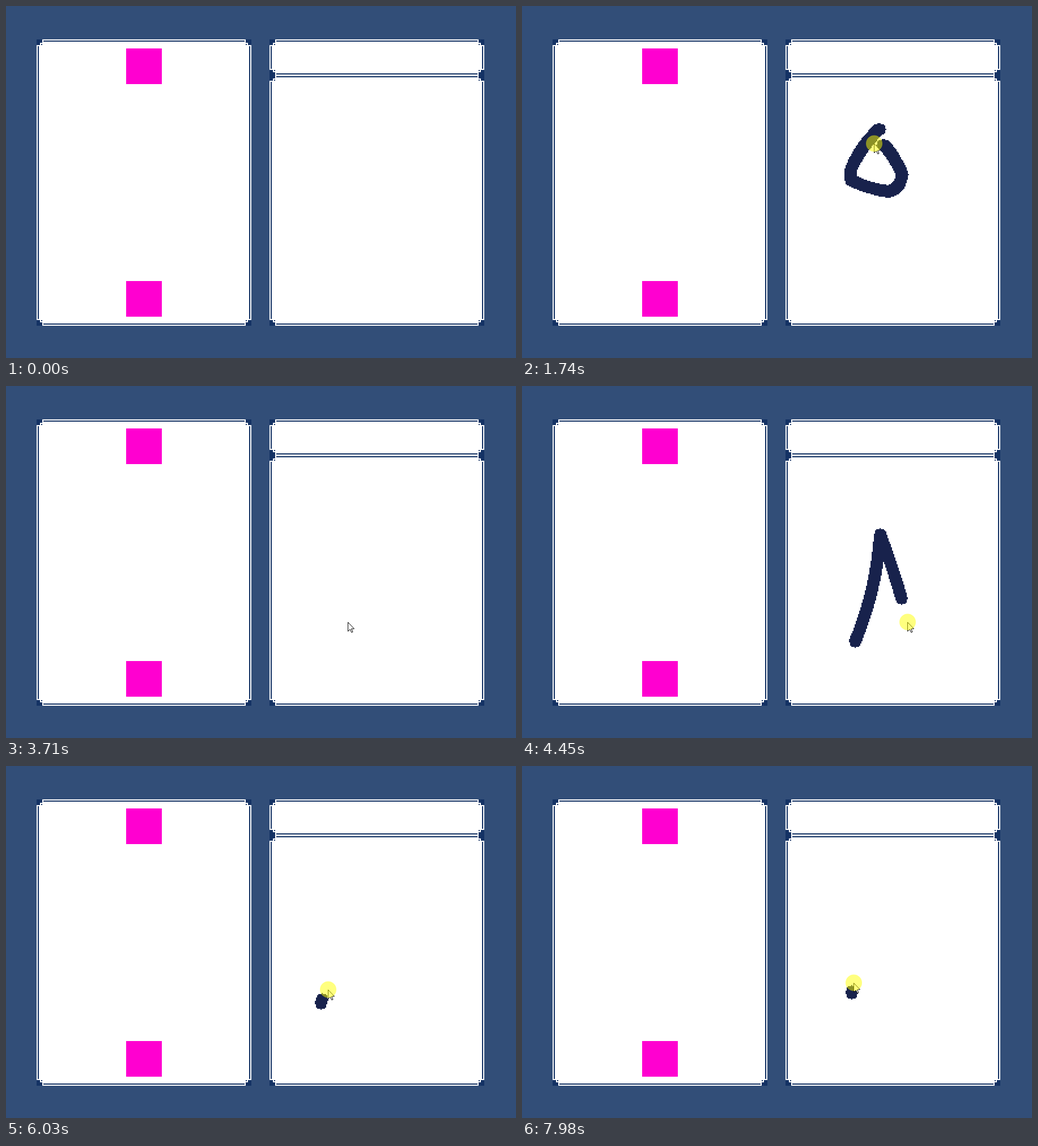
Animation of 900 by 622 pixels, one loop 8 s. Source, as an HTML page with a canvas:

```html
<!DOCTYPE html>
<html lang="en">
<head>
<meta charset="utf-8">
<title>Drawing gestures</title>
<style>
  html, body { margin: 0; width: 100%; height: 100%; overflow: hidden; background: #324e78; }
  canvas { display: block; width: 900px; height: 622px; }
</style>
</head>
<body>
<canvas id="stage" width="900" height="622"></canvas>
<script>
const ctx = document.getElementById('stage').getContext('2d');
const LOOP = 8000, LAG = 60;
const CELL = 2, BRUSH = 5;
const LEFT = 54, RIGHT = 465, TOP = 59, WIDTH = 379, HEIGHT = 506;
const BACK = '#324e78', NAVY = '#143264', INK = '#18224c', PINK = '#ff00d0';

// A stop is the time and place the pointer reaches, and the bow of the way there.
const stop = (t, x, y, bow = 0) => ({ t, x, y, bow });

const gestures = [
  { clear: 1880, stops: [
    stop(950, 631, 217), stop(1180, 579, 292, 5), stop(1240, 579, 307),
    stop(1440, 648, 328, 3), stop(1560, 671, 297, 6), stop(1660, 640, 246, 2),
    stop(1740, 621, 243)
  ] },
  { clear: 5420, stops: [
    stop(3900, 588, 451), stop(4220, 632, 262, 8), stop(4500, 688, 451, -4),
    stop(4780, 569, 346, 4), stop(4990, 825, 273, -7), stop(5050, 811, 282),
    stop(5250, 606, 409)
  ] },
  { clear: 7050, stops: [
    stop(5950, 555, 419), stop(6030, 567, 396), stop(6190, 623, 186, 15),
    stop(6400, 701, 421, 11), stop(6570, 541, 311, -4), stop(6740, 716, 270, 2),
    stop(6840, 622, 371, 1), stop(6900, 593, 384)
  ] },
  { clear: LOOP, stops: [stop(7900, 582, 402), stop(7980, 585, 383)] }
];
const wander = [
  stop(40, 819, 588), stop(830, 661, 226, 10),
  stop(2490, 575, 305, -40), stop(2680, 849, 155), stop(2830, 701, 201),
  stop(3040, 701, 201), stop(3700, 604, 415, 10)
];

// The pointer rests at the end of each gesture until it clears.
const rest = g => ({ ...g.stops[g.stops.length - 1], t: g.clear, bow: 0 });
const route = gestures
  .flatMap(g => [...g.stops, rest(g)])
  .concat(wander)
  .sort((a, b) => a.t - b.t);

function pointerAt(t) {
  const i = Math.max(1, route.findIndex(s => s.t > t));
  const a = route[i - 1], b = route[i];
  const k = (t - a.t) / (b.t - a.t);
  const dx = b.x - a.x, dy = b.y - a.y;
  const side = 4 * k * (1 - k) * b.bow / (Math.hypot(dx, dy) || 1);
  return [a.x + dx * k - dy * side, a.y + dy * k + dx * side];
}

function rect(x, y, w, h, color) {
  ctx.fillStyle = color;
  ctx.fillRect(x, y, w, h);
}

function panel(x, y, h) {
  const w = WIDTH, c = CELL;
  rect(x, y, w, h, '#fff');
  for (const edge of [y + c, y + h - 2 * c]) rect(x + 6 * c, edge, w - 12 * c, c, NAVY);
  for (const edge of [x + c, x + w - 2 * c]) rect(edge, y + 6 * c, c, h - 12 * c, NAVY);
  for (const right of [0, 1]) for (const low of [0, 1]) {
    const notch = (from, size, color) => {
      const near = from * c, far = (from + size) * c;
      rect(right ? x + w - far : x + near, low ? y + h - far : y + near, size * c, size * c, color);
    };
    notch(0, 5, NAVY);
    notch(3, 2, '#fff');
    notch(4, 1, NAVY);
  }
}

function dab(col, row) {
  for (let dy = -BRUSH; dy <= BRUSH; dy++) {
    const half = Math.floor(Math.sqrt(BRUSH * BRUSH - dy * dy));
    rect(RIGHT + (col - half) * CELL, TOP + (row + dy) * CELL, (2 * half + 1) * CELL, CELL, INK);
  }
}

function drawInk(start, end) {
  let last = '';
  for (let t = start; t <= Math.max(start, end); t++) {
    const [x, y] = pointerAt(t);
    const col = Math.floor((x - RIGHT) / CELL), row = Math.floor((y - TOP) / CELL);
    const key = col + ',' + row;
    if (key !== last) dab(col, row);
    last = key;
  }
}

const arrow = new Path2D('M.5 .5V16.5L4.2 13L6.8 18.5L9 17.5L6.5 12H11.5Z');

function drawCursor(t, pressed) {
  const [x, y] = pointerAt(t).map(Math.round);
  ctx.save();
  ctx.translate(x, y);
  ctx.fillStyle = '#fff';
  ctx.fill(arrow);
  ctx.strokeStyle = '#000';
  ctx.stroke(arrow);
  if (pressed) {
    ctx.fillStyle = 'rgba(255,255,0,.5)';
    ctx.beginPath();
    ctx.arc(.5, 0, 14.5, 0, Math.PI * 2);
    ctx.fill();
  }
  ctx.restore();
}

function draw(t) {
  rect(0, 0, 900, 622, BACK);
  panel(LEFT, TOP, HEIGHT);
  panel(RIGHT, TOP, 64);
  panel(RIGHT, TOP + 63, HEIGHT - 63);
  for (const y of [75, 486]) rect(212, y, 63, 63, PINK);
  const active = gestures.find(g => t >= g.stops[0].t && t < g.clear);
  if (active) drawInk(active.stops[0].t, t - LAG);
  if (t >= route[0].t) drawCursor(t, active);
}

const begin = performance.now();
function tick() {
  draw((performance.now() - begin) % LOOP);
  requestAnimationFrame(tick);
}
tick();
</script>
</body>
</html>
```
